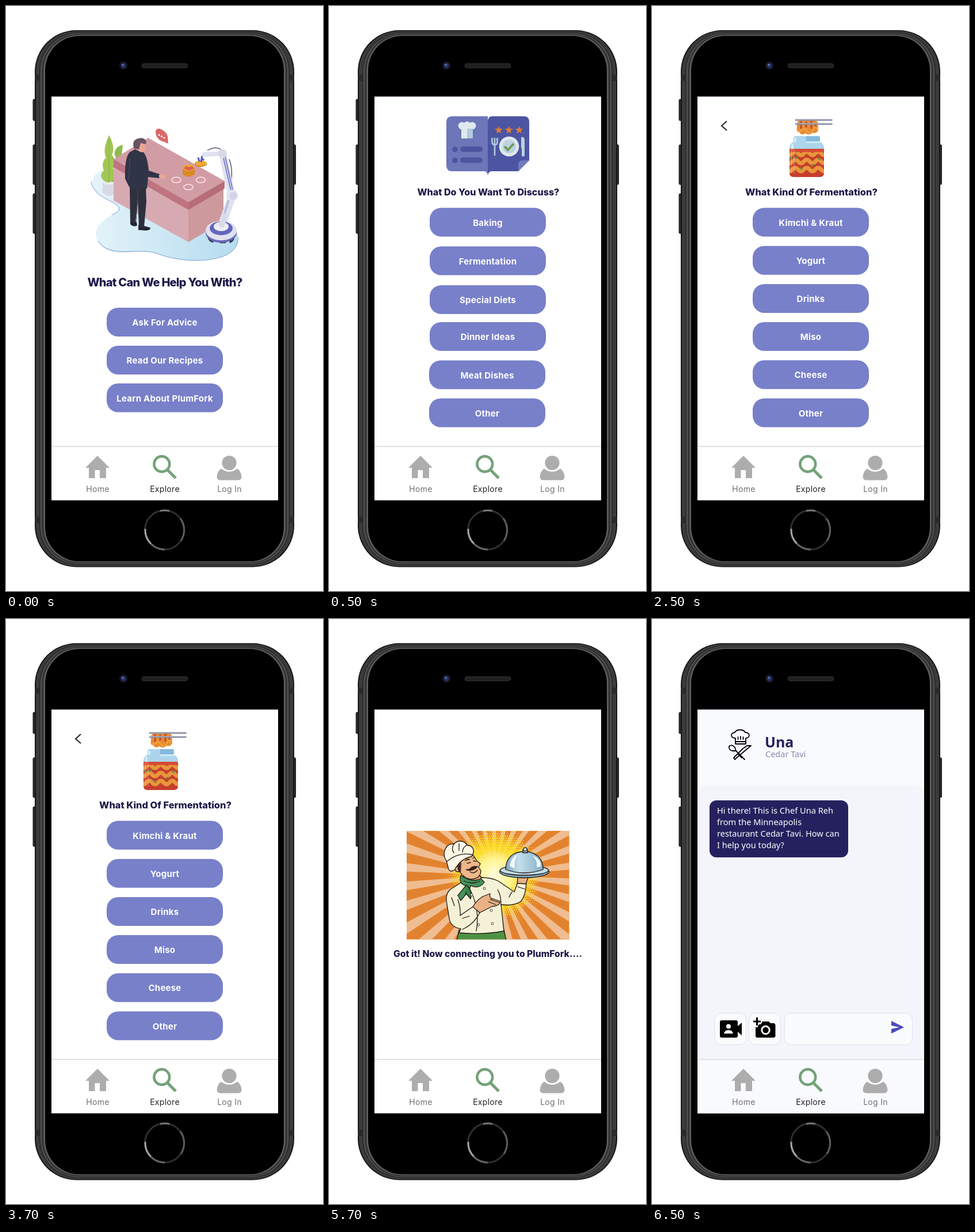
Recreate the animation shown at these times as an HTML page. Size 551x1016 px, loop 8 s.

```html
<!DOCTYPE html>
<html lang="en">
<head>
<meta charset="utf-8">
<title>Cooking help app</title>
<style>
html, body { margin: 0; width: 100%; height: 100%; overflow: hidden; background: #fff; }
svg { display: block; }
text { font-family: Inter, "Open Sans", sans-serif; }
.title { font-weight: 800; fill: #1d1a49; text-anchor: middle; }
.label { font-size: 15px; font-weight: 700; letter-spacing: .22px; fill: #fff; text-anchor: middle; }
.nav { font-size: 14px; letter-spacing: .3px; fill: #707070; text-anchor: middle; }
.chat text { font-family: "Noto Sans", sans-serif; }
.screen { display: none; }
.ink { stroke: #1d1714; stroke-width: 1.3; stroke-linejoin: round; stroke-linecap: round; }
.line { fill: none; stroke: #000; stroke-width: 1.8; stroke-linejoin: round; stroke-linecap: round; }
</style>
</head>
<body>
<svg width="551" height="1016" viewBox="0 0 551 1016">
<defs>
  <linearGradient id="pool"><stop offset="0" stop-color="#e4f3f9"/><stop offset="1" stop-color="#b5dcef"/></linearGradient>
  <linearGradient id="dome"><stop offset="0" stop-color="#7da6bd"/><stop offset=".35" stop-color="#c4dfeb"/><stop offset="1" stop-color="#83aec6"/></linearGradient>
  <radialGradient id="glow" gradientUnits="userSpaceOnUse" cx="288" cy="445" r="78"><stop offset="0" stop-color="#fffde0"/><stop offset=".38" stop-color="#fff48e"/><stop offset=".68" stop-color="#ffdf25" stop-opacity=".75"/><stop offset="1" stop-color="#ffd51c" stop-opacity="0"/></radialGradient>
  <clipPath id="poster"><rect x="135" y="368" width="282.5" height="188.5"/></clipPath>
  <clipPath id="jar"><path d="M239 248H299V290Q299 297 292 297H246Q239 297 239 290Z"/></clipPath>
</defs>

<!-- phone -->
<g fill="#2c2c2c" stroke="#171717">
  <rect x="47" y="162" width="5" height="37" rx="1.5"/><rect x="47" y="241" width="5" height="69" rx="1.5"/>
  <rect x="47" y="326" width="5" height="69" rx="1.5"/><rect x="498.500" y="241" width="5" height="69" rx="1.5"/>
</g>
<g id="shell"></g>
<path d="M50 119h8v11h-8zM493 119h8v11h-8zM50 887h8v11h-8zM493 887h8v11h-8z" fill="#2a2a2a"/>
<circle cx="204" cy="103.5" r="7.2" fill="#141722"/><circle cx="204" cy="103.5" r="4.2" fill="#25356c"/><circle cx="203" cy="102" r="1.5" fill="#6885b8"/>
<rect x="236" y="100" width="80" height="7.5" rx="3.7" fill="#202020" stroke="#303030"/>
<g fill="none" stroke-width="3"><circle cx="275.500" cy="910" r="34" stroke="#303030"/>
  <path d="M242 908A34 34 0 0 0 252 934" stroke="#a3a3a3"/><path d="M252 934A34 34 0 0 0 276 944" stroke="#656565"/>
  <path d="M268 877A34 34 0 0 1 284 877" stroke="#777"/><path d="M303 890A34 34 0 0 1 304 929" stroke="#5c5c5c"/></g>
<path d="M79 157H473V858.500H79Z" fill="#fff"/><path d="M79 157.5H473" stroke="#c7b1cb"/>

<!-- counter scene -->
<g class="screen">
  <path d="M166 286C145 294 143 318 166 331C185 341 210 349 184 363C158 377 147 396 165 416C190 441 231 418 263 430C304 446 363 446 389 429C409 415 406 397 394 382L325 310Z" fill="url(#pool)"/>
  <path d="M148 305C150 321 166 331 178 337C201 349 203 354 184 363M160 408C180 440 231 418 263 430C304 446 363 446 389 429C400 421 404 411 403 402" fill="none" stroke="#7b9dd6"/>
  <path d="M168 306H190V324Q179 335 168 324Z" fill="#d9dae6"/><ellipse cx="179" cy="306" rx="11" ry="4" fill="#ececf3"/>
  <path d="M183 306C196 303 200 293 198 282L203 241C189 245 186 255 191 263C184 278 190 286 183 306Z" fill="#8cba4c"/>
  <path d="M178 307C163 303 163 291 170 286C166 275 169 268 174 263C168 251 174 237 179 224C186 237 189 249 184 259C191 265 190 275 186 282C192 294 188 304 178 307Z" fill="#a2c653"/>
  <path d="M179 232V306" stroke="#83ae48"/>
  <path d="M187 276L317 350V410L187 338Z" fill="#d7aab2"/><path d="M317 350L378 314V374L317 410Z" fill="#cd999c"/>
  <path d="M187 266L317 340V354L187 280Z" fill="#be7481"/><path d="M317 340L380 304V317L317 354Z" fill="#b76c79"/>
  <path d="M247 229L380 304L317 341L187 266Z" fill="#d29ca4"/>
  <g fill="#d59ba2" stroke="#f4d9da" stroke-width="2"><ellipse cx="296" cy="302" rx="8" ry="4.7"/><ellipse cx="338.5" cy="302" rx="8" ry="4.7"/><ellipse cx="317" cy="314.5" rx="8" ry="4.7"/></g>
  <path d="M307 281V292Q317 301 328 292V281Z" fill="#d98a20"/><ellipse cx="317.5" cy="281" rx="10.5" ry="5.5" fill="#eba732"/><path d="M309 282l4-4 5 2 5-2 4 4-9 4z" fill="#df5d55"/>
  <path d="M328 273V276Q338 283 349 276V273Z" fill="#d98016"/><ellipse cx="338.5" cy="273" rx="10.5" ry="4.5" fill="#efaa36"/>
  <path d="M334 263l2 7M341 260l-2 11M339 263l5 5" stroke="#555bb7" stroke-width="3"/>
  <path d="M350 251C358 246 367 245 374 249M388 266C397 290 388 301 395 321" fill="none" stroke="#393d60" stroke-width="1.3"/>
  <g fill="none" stroke="#e0e1f0" stroke-linecap="round"><path d="M344 258L377 256" stroke-width="8"/><path d="M377 258L392 328" stroke-width="13"/><path d="M393 330L375 381" stroke-width="14"/></g>
  <path d="M378 264L391 321M381 262L394 320" stroke="#676cbb" stroke-width="1.5"/><path d="M388 335L374 378" stroke="#b6b8d8" stroke-width="3"/>
  <circle cx="376" cy="256" r="7.5" fill="#d7d8e8"/><circle cx="393" cy="329" r="10" fill="#e4e5f1"/><circle cx="395" cy="330" r="7" fill="#d3d5e7"/>
  <path d="M350 400l9 2 2 9q-9 0-11-11zM387 404l10-3q0 8-8 11zM370 408h12v4h-10z" fill="#36364c"/>
  <ellipse cx="374" cy="394" rx="27" ry="17" fill="#6868b7"/><ellipse cx="374" cy="390" rx="27" ry="17" fill="#e1e1ef"/><ellipse cx="374" cy="386" rx="20" ry="12" fill="#6267bd"/><ellipse cx="374" cy="383" rx="13" ry="8" fill="#eeeef6"/>
  <path d="M369 381L377 360H386L379 384Q374 387 369 381Z" fill="#dadbea"/>
  <path d="M260 219Q260 212 267 213Q278 217 281 226L282 239L275 236Q261 233 260 219Z" fill="#d96868"/><g fill="#fff"><circle cx="266" cy="224" r="1.6"/><circle cx="270.5" cy="226.5" r="1.6"/><circle cx="275" cy="229" r="1.6"/></g>
  <path d="M216 371l11 4 1 6q-6 4-12-2zM230 380l10 2 11 3q1 4-7 5l-14-1z" fill="#242633"/>
  <path d="M215 310H243L244 340L240 384H231L229 334L225 376H216Z" fill="#2e303e"/><path d="M229 318V335L226 374" fill="none" stroke="#454855"/>
  <path d="M224 249L239 254Q246 262 248 286L267 292V299L247 297L245 317Q229 320 214 314L207 300Q206 263 215 254Z" fill="#2f3447"/><path d="M216 264L213 303M245 268L248 287" stroke="#474c61" fill="none"/>
  <path d="M266 293l10-1 3 4-5 5-8-3z" fill="#e7a795"/>
  <path d="M227 238H242V247Q240 255 234 254L226 249Z" fill="#eba596"/><path d="M223 248Q218 235 227 231Q239 226 244 235L243 240L234 238L231 249Z" fill="#695263"/>
  <text class="title" x="276" y="486.5" font-size="20" letter-spacing="-.75">What Can We Help You With?</text>
</g>

<!-- book -->
<g class="screen">
  <path d="M276 191.5H214Q204 191.5 204 201.5V277Q204 287 214 287H270Q275 287 276 294Z" fill="#6c76b8"/>
  <path d="M276 201Q276 191.5 284 191.5H339Q348 191.5 348 201V268L329 287H282Q277 288 276 294Z" fill="#4c55a1"/><path d="M329 287V276Q329 268 337 268H348Z" fill="#727bbd"/>
  <g fill="#dfeaed"><circle cx="231" cy="208" r="6.5"/><circle cx="240" cy="207" r="6.5"/><circle cx="249" cy="208" r="6.5"/><path d="M230 210H250V230H230Z"/></g><path d="M240 213H250V230H240Z" fill="#afcadd"/>
  <g fill="#4c55a1"><circle cx="219" cy="249" r="4.8"/><circle cx="219" cy="268" r="4.8"/><rect x="228" y="244" width="39" height="9.5" rx="4.7"/><rect x="228" y="263" width="39" height="9.5" rx="4.7"/></g>
  <g id="stars" fill="#e07e35"></g>
  <circle cx="313" cy="244" r="17.3" fill="#dfe9ed"/><circle cx="313" cy="244" r="12" fill="#bdd3e2"/><path d="M305 244L311 250L321 239" fill="none" stroke="#6f9d54" stroke-width="4"/>
  <path d="M283.5 229V236Q283.5 241 288 241Q292.500 241 292.500 236V229M288 229V260" fill="none" stroke="#afcadd" stroke-width="2.7"/><path d="M334 228Q340 226 340 234V260Q337 263 335 260V247H334Z" fill="#b9d0df"/>
  <text class="title" x="277" y="329" font-size="16.1">What Do You Want To Discuss?</text>
</g>

<!-- jar -->
<g class="screen">
  <path d="M130 200L121 208L130 216" fill="none" stroke="#222" stroke-width="2"/>
  <path d="M252 203Q258 194 267 199Q278 195 288 201L289 216Q285 222 280 220Q273 226 267 221Q259 226 256 219Q250 219 252 211Z" fill="#e88b32"/><path d="M259 200v13M268 201v10M277 199v14M284 203v7" stroke="#c4452d" stroke-width="3"/><path d="M253 216q5 3 8-1t9 3 10-3 8 1" fill="none" stroke="#f2a740" stroke-width="2"/>
  <path d="M249 198H313.500M249 205H313.500" stroke="#898fa0" stroke-width="3"/><path d="M249 197H313M249 204H313" stroke="#b8bdca"/>
  <path d="M249 226H289Q292 226 292 229V236Q299 239 299 246V249H239V246Q239 239 246 236V229Q246 226 249 226Z" fill="#acd5ec"/><path d="M268 226H289Q292 226 292 229V236H268Z" fill="#83b9df"/><rect x="268" y="235" width="24" height="3" fill="#cfe8f4"/>
  <g clip-path="url(#jar)"><rect x="239" y="248" width="60" height="50" fill="#c73e2d"/><g id="waves" fill="none" stroke="#e8963b" stroke-width="7"></g><path d="M239 251H299" stroke="#d84a34" stroke-width="5"/>
    <path d="M240 263l5 3M249 265l5-4M276 278l6-3M288 264l5 3M257 281l4 3" stroke="#5f8e44" stroke-width="2.5"/><path d="M242 248V290M247 248V291" stroke="#fff" opacity=".16" stroke-width="3"/></g>
  <path d="M249 230v5M244 241v6" stroke="#e1f2fa" stroke-width="3" stroke-linecap="round"/>
  <text class="title" x="277" y="329" font-size="16.4">What Kind Of Fermentation?</text>
</g>

<!-- chef poster -->
<g class="screen">
  <g clip-path="url(#poster)">
    <rect x="135" y="368" width="283" height="189" fill="#e3822e"/><path id="rays" fill="#efbd91"/>
    <circle cx="288" cy="445" r="78" fill="url(#glow)"/><g id="dots" fill="#ffe126"></g>
    <path class="ink" d="M226 540Q264 547 304 540L308 558H222Z" fill="#4e9345"/>
    <path class="ink" d="M232 456L212 469Q203 475 204 489L209 520Q211 535 229 538L226 545Q266 549 304 542L299 496Q322 499 334 490Q342 479 343 459L329 455L322 474L294 455Q282 449 264 449Z" fill="#f5f1d6"/>
    <path class="ink" d="M224 487Q229 502 228 515L251 499L262 510Q252 530 232 539M244 468Q263 502 256 542M293 470Q299 479 299 496M232 520l12-4M213 484l5 14M318 474l-5 9M328 465l12 4" fill="none"/>
    <path class="ink" d="M250 500Q256 489 267 482L280 477Q278 485 285 486L297 490Q298 498 284 499L262 510Z" fill="#eab184"/><path class="ink" d="M280 487l15 5M277 491l13 5" fill="none"/>
    <path class="ink" d="M327 459L329 445Q337 442 347 447L342 460Z" fill="#eab184"/>
    <path class="ink" d="M234 437Q235 451 233 460L257 461L265 449L258 440Z" fill="#dc9d71"/>
    <path class="ink" d="M222 420Q233 407 251 411L257 420L263 425L260 431L264 437Q264 451 247 452Q235 450 228 440Z" fill="#edb78a"/>
    <path d="M218 424L224 417L230 424L229 441L221 437Z" fill="#4a3021"/><path class="ink" d="M224 430q-5-4-6 2 1 8 8 7z" fill="#e4a77a"/>
    <path d="M236 420q5-5 9-2M249 416l5-2M238 435q6 1 10-4 4-2 10-1-5 6-10 6-5 2-10-1z" fill="#3a251c" stroke="#3a251c" stroke-width="1.3"/><path class="ink" d="M240 424l6-1M251 420l4 1M245 439q7 5 13-3" fill="none"/>
    <path class="ink" d="M208 435L204 420C195 406 204 388 217 391C225 382 237 386 240 393C251 393 255 404 247 413Q230 415 218 436Q211 440 208 435Z" fill="#faf7e5"/><path class="ink" d="M205 421Q224 405 248 409M217 391q-5 8 0 15M239 393q-7 4-7 12M226 390v12" fill="none"/>
    <path class="ink" d="M229 445Q247 459 264 451L270 457Q261 470 246 463L244 471L229 489L224 480L238 463Q225 461 229 445Z" fill="#44935b"/><path class="ink" d="M239 462Q250 472 246 486L237 475" fill="#358249"/><path class="ink" d="M235 455q14 7 27 0" fill="none"/>
    <g fill="#fff" stroke="#493c32"><circle cx="270" cy="468" r="2"/><circle cx="282" cy="506" r="2"/><circle cx="284" cy="529" r="2"/><circle cx="260" cy="531" r="2"/><circle cx="248" cy="479" r="2"/></g>
    <ellipse class="ink" cx="339.500" cy="439" rx="43" ry="10.5" fill="#82a9be"/><ellipse class="ink" cx="339.500" cy="436.500" rx="42" ry="8.500" fill="#c4dce7"/>
    <path class="ink" d="M307 435C307 413 322 404 340 404C359 404 373 416 372 435Q340 447 307 435Z" fill="url(#dome)"/><path d="M314 429Q316 414 328 409Q321 419 323 433ZM361 431Q363 418 353 411Q369 416 368 430Z" fill="#f4fafb"/>
    <path class="ink" d="M337 406V401H345V406Z" fill="#a8c7d7"/><circle class="ink" cx="341" cy="400" r="3.2" fill="#d0e1e9"/>
  </g>
  <text class="title" x="276" y="587" font-size="15.7">Got it! Now connecting you to PlumFork....</text>
</g>

<!-- chat -->
<g class="screen chat">
  <path d="M79 158H473V858.500H79Z" fill="#f9fafd"/><path d="M79 308Q79 288 99 288H453Q473 288 473 308V765H79Z" fill="#f4f5fa"/>
  <g class="line">
    <path d="M145 217V207C137 207 135 198 144 197C147 191 159 191 162 197C171 197 171 207 163 207V217ZM145 213H163M149.500 205v4M154 204v5M158.500 205v4"/>
    <path d="M134 221Q139 217 144 223L146 229L161 244M134 221Q133 228 140 229L146 229"/>
    <path d="M172 220L147 241L144 244L142 241L157 226L165 220Z"/><path d="M150 235l6 6"/>
  </g>
  <text x="196" y="223" font-size="25" font-weight="700" fill="#25215f">Una</text><text x="197" y="240" font-size="14.500" fill="#8a87b0">Cedar Tavi</text>
  <rect x="100" y="315" width="241" height="99" rx="12" fill="#25215f"/>
  <g font-size="14.600" font-weight="500" fill="#fff"><text x="113" y="338">Hi there! This is Chef Una Reh</text><text x="113" y="358">from the Minneapolis</text><text x="113" y="378">restaurant Cedar Tavi. How can</text><text x="113" y="398">I help you today?</text></g>
  <g fill="#fafbfd" stroke="#dfe1e8"><rect x="109" y="684.500" width="55" height="55" rx="12"/><rect x="168.500" y="684.500" width="55" height="55" rx="12"/><rect x="230.500" y="684.500" width="222" height="55" rx="12"/></g>
  <rect x="118" y="697" width="31" height="30" rx="3"/><path d="M147 709L156 701V723L147 715Z"/><g fill="#fafbfd"><circle cx="133" cy="707.500" r="4"/><path d="M125 720Q126 714 133 714Q140 714 141 720Z"/></g>
  <path d="M184 704H189L192 699H203L206 702H211Q214.500 702 214.500 706V724Q214.500 727 211 727H183Q180 727 180 724V709H184Z"/><circle cx="197.500" cy="714" r="6.700" fill="none" stroke="#fafbfd" stroke-width="3"/>
  <path d="M182.500 692V706M176 699H189" stroke="#fafbfd" stroke-width="6"/><path d="M182.500 692V706M176 699H189" stroke="#000" stroke-width="3"/>
  <path d="M416 698L438 709L416 720V712L430 709L416 706Z" fill="#4948bb"/>
</g>

<!-- tab bar -->
<path d="M79 765H473" stroke="#e1e2e6" stroke-width="2"/>
<g fill="#adadad">
  <path d="M159 781L180 802H174V820H163V806H154.500V820H144V802H138Z"/>
  <circle cx="388" cy="793.500" r="12.600"/><path d="M374 803.500Q388 814 402 803.500Q409 808 409.500 818Q409 823.500 403 823.500H373Q367 823.500 366.500 818Q367 808 374 803.500Z"/>
</g>
<g fill="none" stroke="#74a27a"><circle cx="270.800" cy="795.500" r="13.400" stroke-width="4.600"/><path d="M280 805L295 820" stroke-width="5.200"/></g>
<text class="nav" x="159.500" y="844">Home</text><text class="nav" x="276" y="844" style="fill:#222">Explore</text><text class="nav" x="388.500" y="844">Log In</text>
</svg>
<script>
const NS = "http://www.w3.org/2000/svg";
const $ = id => document.getElementById(id);
const screens = [...document.querySelectorAll(".screen")];

function add(parent, tag, attrs, text) {
  const el = document.createElementNS(NS, tag);
  for (const key in attrs) el.setAttribute(key, attrs[key]);
  if (text) el.textContent = text;
  parent.append(el);
}

// Nested metal layers, from the rim to the black front.
[["#161616", 0, 0], ["#3b3b3b", 2, 1.5], ["#2b2b2b", 8, 4], ["#555", 10, 5.5],
  ["#343434", 12, 6.5], ["#616161", 15.5, 8.5], ["#000", 18, 10]]
  .forEach(([fill, dx, dy]) => add($("shell"), "rect", {
    x: 50 + dx, y: 42 + dy, width: 451 - 2 * dx, height: 932.5 - 2 * dy, rx: 72 - dx * .7, fill
  }));

function button(screen, label, y, x = 175) {
  add(screen, "rect", { x, y, width: 202, height: 50, rx: 20, fill: "#7880ca" });
  add(screen, "text", { class: "label", x: x + 101, y: y + 31 }, label);
}

[["Ask For Advice", 524], ["Read Our Recipes", 590], ["Learn About PlumFork", 655.5]]
  .forEach(b => button(screens[0], ...b));
[["Baking", 350.5], ["Fermentation", 417.5], ["Special Diets", 485], ["Dinner Ideas", 549],
  ["Meat Dishes", 615.5, 174], ["Other", 681.5, 174]].forEach(b => button(screens[1], ...b));
["Kimchi & Kraut", "Yogurt", "Drinks", "Miso", "Cheese", "Other"]
  .forEach((label, i) => button(screens[2], label, 350.5 + i * 66.2));

for (const cx of [295, 312.7, 330.5]) {
  const points = Array.from({ length: 10 }, (_, i) => {
    const a = i * Math.PI / 5, r = i % 2 ? 3 : 7;
    return [cx + r * Math.sin(a), 215.5 - r * Math.cos(a)];
  });
  add($("stars"), "polygon", { points: points.join(" ") });
}

for (const y of [256, 270, 284])
  add($("waves"), "path", { d: `M234 ${y}` + "q5 6 10 0t10 0".repeat(4) });

// Alternating wedges fan out from the glow.
const at = a => `${288 + 240 * Math.cos(a)} ${445 + 240 * Math.sin(a)}`;
let rays = "";
for (let i = 0; i < 30; i++) {
  const a = (i + .2) * Math.PI / 15;
  rays += `M288 445L${at(a)}L${at(a + .095)}Z`;
}
$("rays").setAttribute("d", rays);

for (let row = -26; row <= 26; row++)
  for (let col = -26; col <= 26; col++) {
    const x = col * 4 + (row & 1) * 2, y = row * 4;
    const d = Math.hypot(x, y), wave = 85 + 13 * Math.cos(12 * Math.atan2(y, x));
    if (d > 42 && d < wave)
      add($("dots"), "circle", { cx: 288 + x, cy: 445 + y, r: (1.8 * (1 - (d - 42) / 65)).toFixed(2) });
  }

const starts = [0, 500, 2500, 4500, 6500], loop = 8000;
const origin = performance.now();
function draw(now) {
  const t = Math.max(0, now - origin) % loop;
  const current = starts.filter(s => s <= t).length - 1;
  screens.forEach((s, i) => s.style.display = i === current ? "inline" : "none");
  requestAnimationFrame(draw);
}
draw(origin);
</script>
</body>
</html>
```
